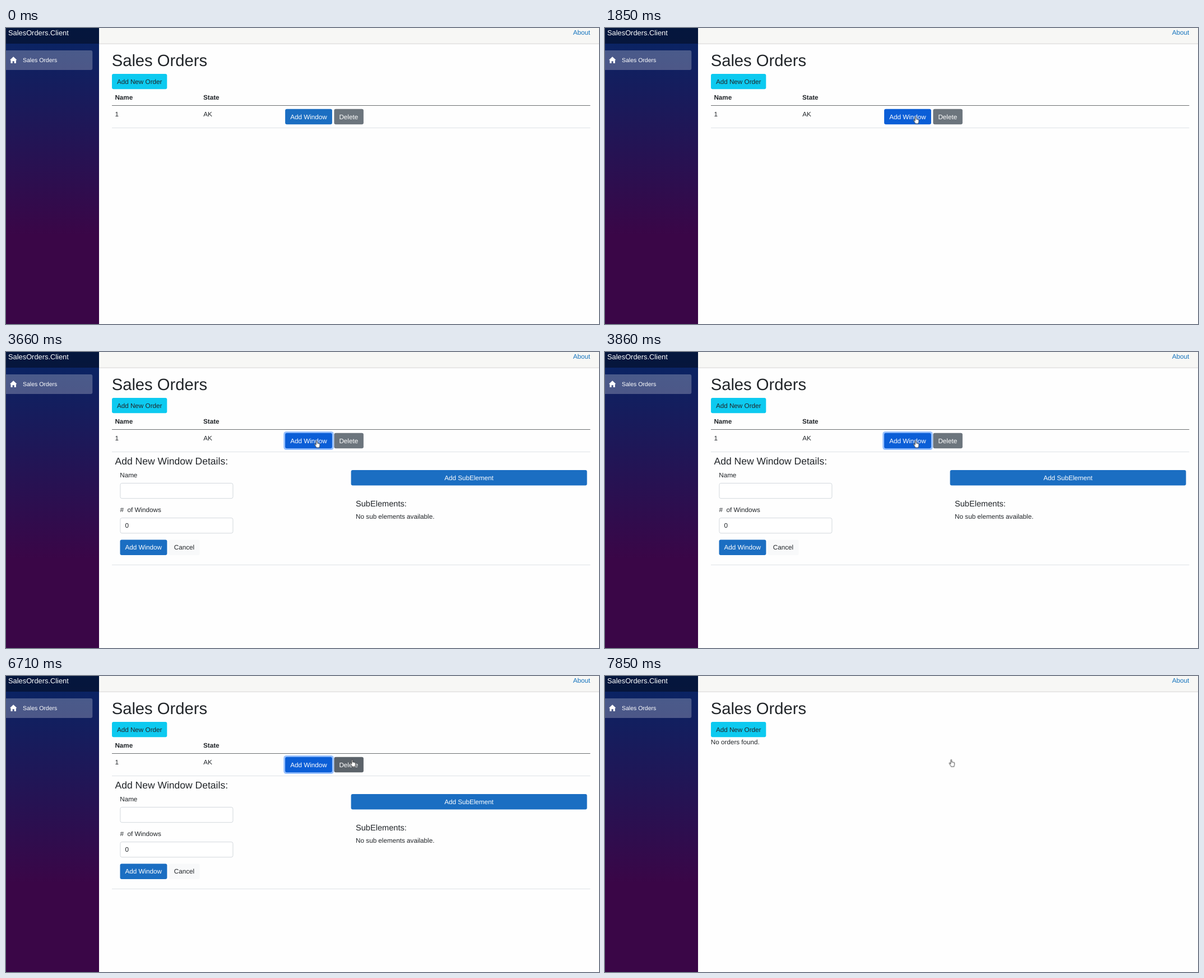
Recreate the animation shown at these times as an HTML page. Size 1058 by 529 pixels, loop 8 s.

```html
<!DOCTYPE html>
<html lang="en">
<head>
<meta charset="utf-8">
<title>Sales Orders</title>
<style>
  html, body { margin: 0; width: 100%; height: 100%; overflow: hidden; background: #fefefe; }
  svg { display: block; width: 1058px; height: 529px; }
  text { font: 11.7px "Liberation Sans", Arial, sans-serif; fill: #212529; text-rendering: geometricPrecision; white-space: pre; }
  .h1 { font-size: 29.2px; }
  .h4 { font-size: 17.52px; }
  .h5 { font-size: 14.6px; }
  .brand { font-size: 12.85px; }
  .nav { font-size: 10.5px; }
  .bold { font-weight: bold; }
  .light { fill: #fff; }
  .link { fill: #1473bd; }
  .primary { fill: #1b6ec2; }
  .rule { fill: #dee2e6; }
  .input { fill: #fff; stroke: #ced4da; stroke-width: .9; }

  .cursor, .arrow, .hand, .table, .form, .empty, .click { animation: 8s step-end infinite; }
  .add, .del, .ring-add, .ring-del { animation: 8s linear infinite; }
  .cursor { animation-name: move; }
  .arrow { animation-name: arrow; }
  .hand { animation-name: hand; }
  .table { animation-name: table; }
  .form { animation-name: form; }
  .empty { animation-name: empty; }
  .click { animation-name: click; }
  .add { animation-name: add; }
  .del { animation-name: del; }
  .ring-add { animation-name: ring-add; }
  .ring-del { animation-name: ring-del; }

  @keyframes move {
    0% { transform: translate(1009px, 511px); }
    3% { transform: translate(1009px, 511px); animation-timing-function: steps(3); }
    5.5% { transform: translate(808px, 386px); animation-timing-function: steps(3); }
    8% { transform: translate(751px, 352px); }
    13% { transform: translate(733px, 334px); animation-timing-function: steps(2); }
    14.75% { transform: translate(642px, 243.5px); animation-timing-function: steps(2); }
    16.375% { transform: translate(592px, 195px); animation-timing-function: steps(2); }
    18% { transform: translate(566px, 170px); animation-timing-function: steps(5); }
    22.25% { transform: translate(554px, 159px); }
    23.125% { transform: translate(554px, 158.5px); }
    69% { transform: translate(579.7px, 152.5px); }
    69.75% { transform: translate(606px, 149px); }
    70.625% { transform: translate(619px, 147px); }
    71.375% { transform: translate(622px, 146.5px); }
    72.25% { transform: translate(612px, 146.5px); }
    76.375% { transform: translate(611px, 146.5px); animation-timing-function: steps(2); }
    78% { transform: translate(610px, 146.5px); }
    81.25% { transform: translate(612px, 147px); animation-timing-function: steps(3); }
    83.875%, 100% { transform: translate(617.7px, 149.5px); }
  }
  @keyframes arrow { 0% { opacity: 0; } 3% { opacity: 1; } 18%, 100% { opacity: 0; } }
  @keyframes hand { 0% { opacity: 0; } 18%, 100% { opacity: 1; } }
  @keyframes click {
    0% { opacity: 0; }
    42.375% { opacity: 1; }
    44.125% { opacity: 0; }
    89.75% { opacity: 1; }
    91.5%, 100% { opacity: 0; }
  }
  @keyframes table { 0% { opacity: 1; } 98.125%, 100% { opacity: 0; } }
  @keyframes form { 0% { opacity: 0; } 45% { opacity: 1; } 98.125%, 100% { opacity: 0; } }
  @keyframes empty { 0% { opacity: 0; } 98.125%, 100% { opacity: 1; } }
  @keyframes add {
    0%, 18% { fill: #1b6ec2; }
    19.875%, 89.75% { fill: #0b5ed7; }
    91.625%, 100% { fill: #1b6ec2; }
  }
  @keyframes del {
    0%, 69.75% { fill: #6c757d; }
    71.625%, 100% { fill: #5c636a; }
  }
  @keyframes ring-add {
    0%, 42.5% { opacity: 0; }
    44.375%, 89.75% { opacity: 1; }
    91.625%, 100% { opacity: 0; }
  }
  @keyframes ring-del {
    0%, 89.75% { opacity: 0; }
    91.625%, 100% { opacity: 1; }
  }
</style>
</head>
<body>
<svg viewBox="0 0 1058 529" xmlns="http://www.w3.org/2000/svg">
  <defs>
    <linearGradient id="side" gradientUnits="userSpaceOnUse" x1="0" y1="-13" x2="0" y2="370">
      <stop offset="0" stop-color="#052767"/>
      <stop offset="1" stop-color="#3a0647"/>
    </linearGradient>
  </defs>

  <rect width="1058" height="529" fill="#fefefe"/>
  <rect x="166" width="892" height="28" fill="#f7f7f5"/>
  <rect x="166" y="27.7" width="892" height="1" fill="#d6d5d5"/>
  <text class="link" x="1011.8" y="12.2">About</text>

  <rect width="166" height="529" fill="url(#side)"/>
  <rect width="166" height="28" fill="#000" fill-opacity=".4"/>
  <text class="brand light" x="4" y="12.7">SalesOrders.Client</text>
  <rect x="-6" y="40" width="160.3" height="35" rx="3" fill="#fff" fill-opacity=".25"/>
  <path d="M13.2 51.2L19.6 57.2H17.9V63H14.7V59.2H11.6V63H8.5V57.2H6.8z" fill="#fff"/>
  <text class="nav light" x="30" y="61.1">Sales Orders</text>

  <text class="h1" x="188.7" y="68.4">Sales Orders</text>
  <rect x="189" y="82" width="98.3" height="27.3" rx="3" fill="#0dcaf0"/>
  <text x="197.9" y="100">Add New Order</text>

  <g class="table">
    <text class="bold" x="194.4" y="127.9">Name</text>
    <text class="bold" x="352" y="127.9">State</text>
    <rect x="189" y="138" width="853.4" height="1" fill="#6b6d70"/>
    <text x="194.6" y="157.6">1</text>
    <text x="352.2" y="157.6">AK</text>
    <rect class="ring-add" x="495.2" y="141.9" width="89.6" height="33.2" rx="5" fill="#98c1fe"/>
    <rect class="ring-del" x="582.5" y="141.9" width="58.3" height="33.2" rx="5" fill="#c0c4c8"/>
    <rect class="add" x="498.1" y="144.8" width="83.8" height="27.4" rx="3"/>
    <text class="light" x="507.2" y="162.7">Add Window</text>
    <rect class="del" x="585.4" y="144.8" width="52.5" height="27.4" rx="3"/>
    <text class="light" x="594.4" y="162.7">Delete</text>
    <rect class="rule" x="189" y="178" width="853.4" height="1"/>
  </g>

  <g class="form">
    <text class="h4" x="194.5" y="200.7">Add New Window Details:</text>
    <text x="203.2" y="223.6">Name</text>
    <rect class="input" x="203.9" y="234.5" width="201" height="27.2" rx="3"/>
    <text x="203.4" y="286">#  of Windows</text>
    <rect class="input" x="203.9" y="296.6" width="201" height="27.2" rx="3"/>
    <text x="212.5" y="314.4">0</text>
    <rect class="primary" x="203.5" y="335.5" width="83.9" height="27.4" rx="3"/>
    <text class="light" x="212.4" y="353.4">Add Window</text>
    <rect x="290.6" y="335.5" width="55" height="27.4" rx="3" fill="#f8f9fa"/>
    <text x="299.7" y="353.4">Cancel</text>
    <rect class="primary" x="615.6" y="211" width="421" height="27.4" rx="3"/>
    <text class="light" x="826" y="229" text-anchor="middle">Add SubElement</text>
    <text class="h5" x="624" y="275.7">SubElements:</text>
    <text x="624.1" y="297.6">No sub elements available.</text>
    <rect class="rule" x="189" y="380" width="853.4" height="1"/>
  </g>

  <text class="empty" x="188.8" y="122">No orders found.</text>

  <g class="cursor">
    <circle class="click" r="8.7" fill="#f0e600" fill-opacity=".55"/>
    <path class="arrow" transform="scale(.62)" fill="#fff" stroke="#222" stroke-width="1.3"
      d="M.5 .5V16.5L4.2 13l2.4 5.5 2.2-1L6.5 12H11.5z"/>
    <path class="hand" transform="translate(-4.3 -.3) scale(.62)" fill="#fff" stroke="#222" stroke-width="1.3"
      d="M5.5 13V2a1.5 1.5 0 0 1 3 0v6a1.4 1.4 0 0 1 2.7 .5a1.4 1.4 0 0 1 2.6 .7a1.3 1.3 0 0 1 2.5 1v5c0 2-1.3 3-1.3 5.5H6.5c0-2-2-3.5-3-5.5l-2.3-4c-.8-1.6 1-2.6 2-1.4z"/>
  </g>
</svg>
</body>
</html>
```
